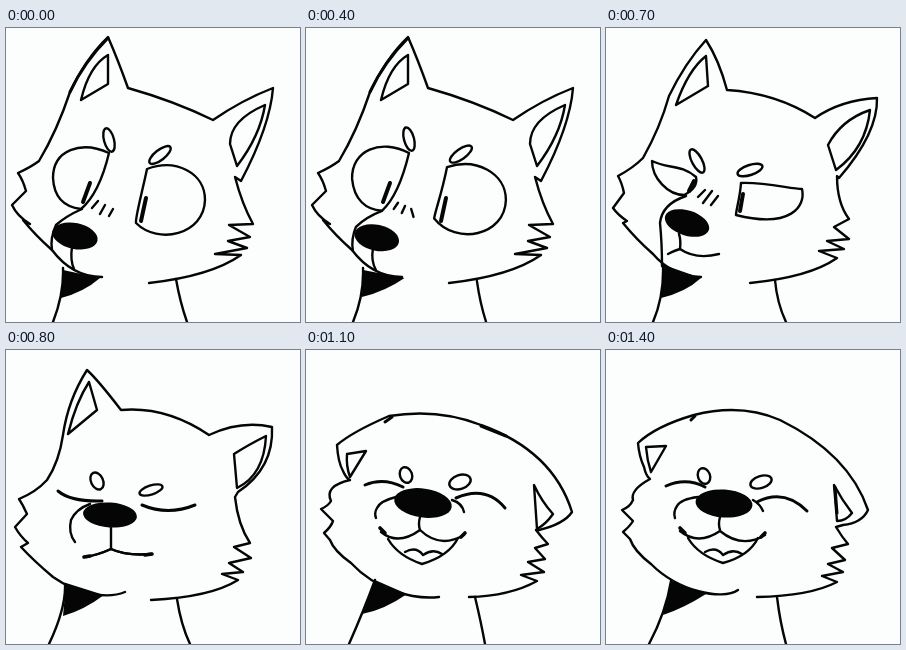
Write an HTML page with a canvas that moves like this. It is 294x294 px and loops after 1600 ms.

```html
<!DOCTYPE html>
<html lang="en">
<head>
<meta charset="utf-8">
<title>Blinking wolf</title>
<style>
html, body { margin: 0; width: 100%; height: 100%; overflow: hidden; background: #fcfefd; }
canvas { display: block; }
</style>
</head>
<body>
<canvas id="stage" width="294" height="294"></canvas>
<script>
const ctx = document.getElementById('stage').getContext('2d');
const INK = '#050505';

// Each pose keeps the same path commands, so poses can be blended number by number.
const rest = {
  head: 'M96 249C74 249 58 238 46 222Q29 207 17 192L24 196Q11 188 6 177L20 163Q17 152 12 145Q25 139 33 133Q51 103 64 64Q80 30 102 9Q112 32 122 60Q168 73 207 92Q236 72 267 60Q264 98 235 153L229 149Q236 176 247 196L223 197L244 209L222 213L241 220L209 226L235 227Q205 248 143 255',
  earL: 'M102 27Q83 38 75 72L102 56Z',
  earR: 'M259 77Q224 92 224 116L231 138Q254 108 259 77Z',
  rim: 'M64 64Q78 34 102 10',
  eyeL: 'M103 125C75 112 47 122 47 150C48 170 58 179 75 181C88 170 97 150 103 125Z',
  eyeR: 'M141 141C170 130 199 145 199 172C198 207 152 217 130 195C129 190 136 165 141 141Z',
  pupils: 'M84 155L77 174M140 170L135 193',
  browL: '103 112 5 12 -15',
  browR: '154 127 13 5 -38',
  blush: 'M92 173L86 180M99 177L94 186M107 181L103 188',
  muzzle: 'M76 181Q60 188 50 197Q44 210 46 222',
  nose: '69 208 23 13 12',
  stem: 'M66 219Q64 232 68 241',
  scruff: 'M57 242L94 250Q78 264 55 270Z',
  neck: 'M57 240Q58 266 47 294M170 251Q174 274 181 294'
};

const settled = {
  ...rest,
  eyeL: 'M103 125C75 110 45 122 46 151C48 172 60 182 76 183C88 172 97 150 103 125Z',
  eyeR: 'M141 139C170 129 200 145 200 172C199 208 150 218 128 190C128 186 136 165 141 139Z',
  browL: '103 111 5 12 -15',
  browR: '155 126 13 5 -35',
  blush: 'M92 175L88 181M99 178L96 185M105 181L108 189',
  muzzle: 'M76 183Q60 189 50 199Q45 211 47 223',
  nose: '71 210 22.5 13 12',
  stem: 'M67 221Q65 233 70 242',
  scruff: 'M57 242L99 250Q80 263 56 269Z',
  neck: 'M57 240Q58 268 47 294M171 253Q174 275 180 294'
};

const half = {
  head: 'M95 249C74 248 58 239 47 226Q30 211 17 195L21 193Q12 187 7 180L18 165Q16 155 12 148Q27 140 37 130Q54 100 63 68Q79 35 100 12Q113 32 121 62Q170 65 209 90Q235 72 271 70Q272 105 233 150L231 148Q231 175 243 191L228 199L243 211L221 213L238 221L213 223L231 230Q204 249 144 255',
  earL: 'M100 28Q82 42 70 77L102 58Z',
  earR: 'M264 82Q235 92 222 117L230 142Q260 120 264 82Z',
  eyeL: 'M90 149C75 136 62 141 46 133C46 150 62 167 78 167C86 163 92 158 90 149Z',
  eyeR: 'M135 155C160 154 185 161 196 161C200 178 185 201 130 187C130 182 134 170 135 155Z',
  pupils: 'M88 153L83 163M137 166L134 183',
  browL: '91 133 5 13 -28',
  browR: '144 142 13 5 -18',
  blush: 'M99 162L92 169M106 163L97 175M112 168L105 177',
  muzzle: 'M80 168Q56 176 54 195Q56 215 56 238',
  nose: '81 195 23 12.5 18',
  stem: 'M73 206Q75 212 74 221',
  lip: 'M62 226Q70 222 74 221Q90 232 113 226',
  scruff: 'M58 237L95 250Q80 264 55 270Z',
  neck: 'M57 238Q58 268 47 294M169 252Q171 275 180 294'
};

const shut = {
  head: 'M119 242C100 250 70 243 47 227Q28 211 15 197L22 193Q14 186 9 177L21 164Q17 155 13 149Q30 142 41 130Q53 112 57 85Q62 50 81 20Q92 30 115 60Q160 56 203 85Q235 70 266 77Q268 118 232 142L229 147Q232 175 244 193L228 197L245 208L223 213L237 222L216 224L232 230Q205 247 145 250',
  earL: 'M83 32Q70 52 62 84L91 60Z',
  earR: 'M260 86Q242 95 228 104L231 138Q258 125 260 86Z',
  lidL: 'M52 141Q65 152 96 151',
  lidR: 'M136 155Q162 166 189 155',
  browL: '91 131 6 9 -25',
  browR: '145 140 12 4.5 -18',
  muzzle: 'M84 154Q70 159 65 170Q62 183 69 192',
  nose: '104 165 27 12.5 4',
  stem: 'M105 176Q105 188 105 199',
  lip: 'M78 207Q92 205 105 199Q120 206 146 204',
  jaw: 'M80 207Q92 205 105 199Q120 206 145 204',
  corners: 'M78 207L84 206M139 205L146 204',
  scruff: 'M60 233L98 245Q78 260 57 266Z',
  neck: 'M59 234Q60 258 43 294M171 249Q175 275 184 294'
};

const low = {
  head: 'M133 247C108 250 70 240 45 213Q28 201 24 190L18 183Q25 177 27 171L15 159Q22 156 25 151Q18 136 44 130Q40 128 37 121Q32 112 31 95Q46 82 83 66Q132 58 175 75Q247 101 266 162Q258 174 233 180L230 180Q236 188 242 194L229 198L239 209L222 212L238 222L215 225L231 231Q204 246 163 247',
  earL: 'M41 104Q40 116 44 127L60 101Z',
  earR: 'M247 164Q236 152 228 135L231 179Q240 174 247 164Z',
  marks: 'M79 72L86 67M175 76L200 86',
  lidL: 'M59 135Q77 127 97 137',
  lidR: 'M150 148Q180 135 199 158',
  browL: '100 125 6 8 -20',
  browR: '154 132 11 7 -18',
  muzzle: 'M90 147Q74 151 71 158Q68 163 70 168',
  cheek: 'M146 150Q156 153 158 162',
  nose: '117 153 29 14.5 8',
  stem: 'M114 167Q112 174 114 180',
  lip: 'M75 182Q92 196 114 180Q134 199 158 185',
  jaw: 'M82 189Q92 206 116 214Q143 206 152 188',
  tongue: 'M99 202Q110 196 117 205Q127 198 136 204',
  corners: 'M74 178L79 183M155 187L159 183',
  scruff: 'M69 230L101 244Q78 260 56 264Z',
  neck: 'M69 230Q58 260 43 294M169 247Q175 272 179 294'
};

const smile = {
  ...low,
  head: 'M132 240C116 251 72 241 45 214Q28 201 24 189L17 182Q24 176 27 171L16 160Q24 157 27 150Q24 140 44 129Q40 126 38 117Q33 106 32 93Q50 76 88 65Q135 53 174 70Q243 104 262 160Q256 173 237 175L230 177Q236 187 242 194L226 198L239 210L222 214L237 222L216 226L231 232Q204 246 151 247',
  earL: 'M40 97Q41 110 45 122L60 96Z',
  earR: 'M246 163Q236 150 228 135L231 171Q240 171 246 163Z',
  marks: 'M85 70L89 66M229 137L231 163',
  lidL: 'M60 136Q80 127 99 137',
  lidR: 'M151 152Q178 138 201 161',
  browL: '98 126 6 8 -20',
  browR: '155 132 11 6 -18',
  muzzle: 'M92 147Q75 149 71 156Q67 162 69 168',
  cheek: 'M147 150Q154 154 157 161',
  nose: '118 153.5 28.5 14 4',
  lip: 'M74 181Q92 196 114 181Q136 199 159 185',
  jaw: 'M82 188Q92 205 117 213Q143 206 152 188',
  scruff: 'M65 231L100 244Q78 258 57 265Z',
  neck: 'M65 231Q60 262 43 294M171 247Q174 272 180 294'
};

// One row per 100 ms: from, to, blend, face shift.
const steps = [
  [rest, settled, 0, 0],
  [rest, settled, .6, 0],
  [rest, settled, 1, 0],
  [rest, settled, .8, 0],
  [rest, settled, .9, 0],
  [rest, settled, 1, 0],
  [settled, half, .5, 0],
  [half, half, 0, 0],
  [shut, shut, 0, 0],
  [shut, low, .35, 0],
  [shut, low, .7, 0],
  [low, low, 0, 0],
  [smile, smile, 0, .5],
  [smile, smile, 0, -.5],
  [smile, smile, 0, 0]
];

const widths = { rim: 3, pupils: 4, corners: 3.6, lidL: 3, lidR: 3, marks: 3 };
const ovals = ['browL', 'browR', 'nose'];
const solid = ['nose', 'scruff'];
const fixed = ['head', 'earL', 'earR', 'rim', 'marks', 'scruff', 'neck'];
const parts = [...new Set([rest, half, shut, low].flatMap(Object.keys))];
const NUM = /-?\d+(\.\d+)?/g;

function blend(a, b, k) {
  if (!a || !b) return k < .5 ? a : b;
  const ends = b.match(NUM);
  let i = 0;
  return a.replace(NUM, n => (+n + (ends[i++] - n) * k).toFixed(2));
}

function shape(name, text) {
  if (!ovals.includes(name)) return new Path2D(text);
  const [x, y, rx, ry, turn] = text.split(' ').map(Number);
  const oval = new Path2D();
  oval.ellipse(x, y, rx, ry, turn * Math.PI / 180, 0, 2 * Math.PI);
  return oval;
}

function draw([from, to, k, shift]) {
  ctx.fillStyle = '#fcfefd';
  ctx.fillRect(0, 0, 294, 294);
  ctx.fillStyle = ctx.strokeStyle = INK;
  ctx.lineCap = ctx.lineJoin = 'round';
  for (const name of parts) {
    const text = blend(from[name], to[name], k);
    if (!text) continue;
    const path = shape(name, text);
    ctx.save();
    if (!fixed.includes(name)) ctx.translate(0, shift);
    ctx.lineWidth = widths[name] || 2.4;
    if (solid.includes(name)) ctx.fill(path);
    else ctx.stroke(path);
    ctx.restore();
  }
}

const start = performance.now();
let shown = -1;

function tick() {
  const t = (performance.now() - start) % 1600;
  const i = Math.min(Math.floor(t / 100), steps.length - 1);
  if (i !== shown) draw(steps[shown = i]);
  requestAnimationFrame(tick);
}
tick();
</script>
</body>
</html>
```
